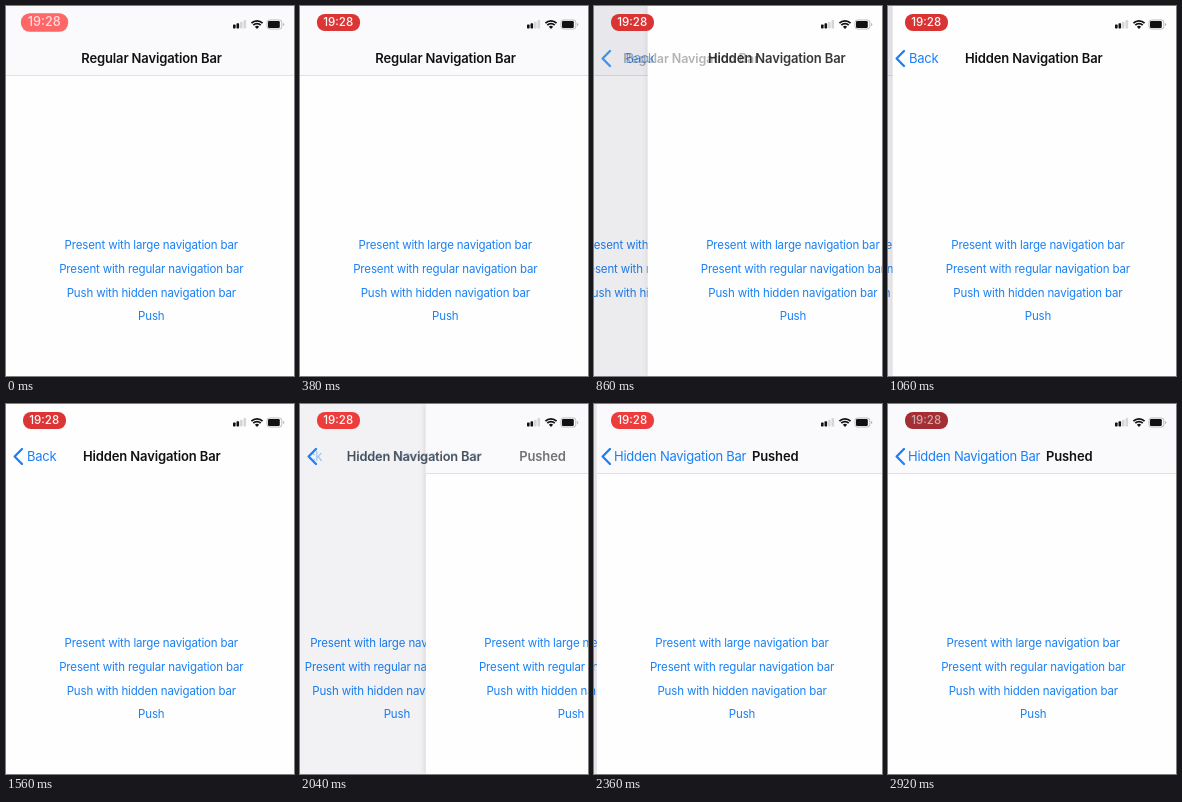
Write an HTML page that moves like this. It is 288 px wide and 370 px high and loops after 2940 ms.

```html
<!DOCTYPE html>
<html lang="en">
<head>
<meta charset="utf-8">
<title>Navigation bar transitions</title>
<style>
html, body { margin: 0; width: 100%; height: 100%; overflow: hidden; background: #fefefe; }
#stage {
  position: relative; width: 288px; height: 370px; overflow: hidden;
  font: 13px Inter, "Open Sans", sans-serif; white-space: nowrap; color: #1a80f4;
}
.page, .dim { position: absolute; inset: 0; background: #fefefe; }
.page.bar::before {
  content: ""; position: absolute; left: 0; right: 0; top: 0; height: 69px;
  background: #faf9fc; border-bottom: 1px solid #e1e0e3;
}
.dim { background: #2a1a38; opacity: 0; }
.link {
  position: absolute; left: 145.3px; transform: translate(-50%, -50%);
  font-size: 11.5px; letter-spacing: -.15px;
}
#items { position: absolute; left: 0; top: 42px; width: 288px; height: 20px; clip-path: inset(0 0 0 12px); }
#items div { position: absolute; left: 0; line-height: 20px; transform-origin: 0 50%; }
.title { font-weight: 600; letter-spacing: -.13px; color: #111; }
.back { letter-spacing: -.25px; }
#pill {
  position: absolute; left: 17px; top: 7.5px; width: 42.5px; height: 17px; border-radius: 8px;
  font-size: 11.5px; font-weight: 500; line-height: 17px; text-align: center;
}
svg { position: absolute; left: 0; top: 0; }
</style>
</head>
<body>
<div id="stage">
  <div id="pages"></div>
  <div id="items">
    <div class="back" id="backShort">Back</div>
    <div class="back" id="backLong">Hidden Navigation Bar</div>
    <div class="title" id="regular">Regular Navigation Bar</div>
    <div class="title" id="hidden">Hidden Navigation Bar</div>
    <div class="title" id="pushed">Pushed</div>
  </div>
  <svg width="288" height="70" fill="none">
    <path id="chevron" d="M16 45L8.6 52.5L16 60" stroke="#1a80f4" stroke-width="2.3" stroke-linecap="round" stroke-linejoin="round"/>
    <g fill="#111">
      <rect x="227" y="18.5" width="2.6" height="4" rx=".7"/>
      <rect x="230.5" y="17.3" width="2.6" height="5.2" rx=".7"/>
      <rect x="234" y="15.7" width="2.6" height="6.8" rx=".7" fill="#d6d6d8"/>
      <rect x="237.5" y="14" width="2.6" height="8.5" rx=".7" fill="#d6d6d8"/>
      <path d="M251 23L248.9 20.8A3 3 0 0 1 253.1 20.8Z"/>
      <rect x="262" y="15" width="11.8" height="7" rx="1.3"/>
      <path d="M277.2 17V20A1.6 1.6 0 0 0 277.2 17Z" fill="#aaa"/>
    </g>
    <g stroke="#111" stroke-width="1.8">
      <path d="M245.4 17.2A8 8 0 0 1 256.6 17.2M247.3 19.2A5.2 5.2 0 0 1 254.7 19.2"/>
      <rect x="261" y="14" width="14.8" height="9" rx="2.4" stroke="#b4b4b6" stroke-width=".9"/>
    </g>
  </svg>
  <div id="pill">19:28</div>
</div>
<script>
const LOOP = 2940, WIDTH = 288, PARALLAX = 86;
const BACK_SCALE = .957; // back label width relative to the title
const $ = id => document.getElementById(id);
const links = ["Present with large navigation bar", "Present with regular navigation bar",
  "Push with hidden navigation bar", "Push"];

const pages = [true, false, true].map(bar => {
  const page = document.createElement("div");
  page.className = bar ? "page bar" : "page";
  page.innerHTML = links.map((text, i) =>
    `<div class="link" style="top:${239.3 + i * 23.7}px">${text}</div>`).join("") + '<div class="dim"></div>';
  return $("pages").appendChild(page);
});

const clamp = v => Math.max(0, Math.min(1, v));
const lerp = (a, b, k) => a + (b - a) * k;
const mix = (a, b, k) => a.map((v, i) => lerp(v, b[i], k));
const rgb = c => `rgb(${c.map(Math.round)})`;

// Critically damped spring, 0 to 1
function spring(ms) {
  const u = Math.max(0, ms) * .015;
  return 1 - (1 + u) * Math.exp(-u);
}

function place(id, x, opacity, scale = 1) {
  $(id).style.transform = `translateX(${x}px) scale(${scale})`;
  $(id).style.opacity = opacity;
}

function placePage(page, enter, leave) {
  page.style.transform = `translateX(${WIDTH * (1 - enter) - PARALLAX * leave}px)`;
  page.style.boxShadow = enter > 0 && enter < .999 ? `0 0 6px rgba(0,0,0,${.08 + .24 * (1 - enter)})` : "none";
  page.lastChild.style.opacity = leave * .1;
}

function drawPill(t) {
  const glow = (1 - clamp(t / 480)) ** 2;
  const warm = clamp((t - 1500) / 500);
  const dark = clamp((t - 2640) / 280);
  const red = mix(mix([217, 52, 52], [236, 60, 60], warm), [255, 102, 104], glow);
  const pill = $("pill").style;
  pill.background = rgb(mix(red, [163, 46, 51], dark));
  pill.color = rgb(mix(mix([255, 250, 250], [255, 220, 220], glow), [205, 170, 172], dark));
  pill.transform = `scale(${1 + .1 * glow})`;
}

function drawItems(p, q) {
  const slideP = p ** 1.15, slideQ = q ** 1.15;
  place("regular", 75.2 - 57 * slideP, 1 - p * p, lerp(1, BACK_SCALE, slideP));
  place("backShort", 21 + 54 * (1 - slideP) - 49 * q, p * p * (1 - q));
  place("hidden", 77 + 218 * (1 - p) - 57 * slideQ, p * (1 - q * q), lerp(1, BACK_SCALE, slideQ));
  place("backLong", 20 + 57 * (1 - slideQ), q * q, lerp(1 / BACK_SCALE, 1, slideQ));
  place("pushed", 158 + 144 * (1 - q), q);
  $("chevron").style.opacity = p;
}

function draw(now) {
  const t = now % LOOP;
  const p = spring(t - 655), q = spring(t - 1915);
  placePage(pages[0], 1, p);
  placePage(pages[1], p, q);
  placePage(pages[2], q, 0);
  // Bar items settle slightly before the pages
  drawItems(clamp(p * 1.02), clamp(q * 1.02));
  drawPill(t);
}

const start = performance.now();
function tick() {
  draw(performance.now() - start);
  requestAnimationFrame(tick);
}
tick();
</script>
</body>
</html>
```
